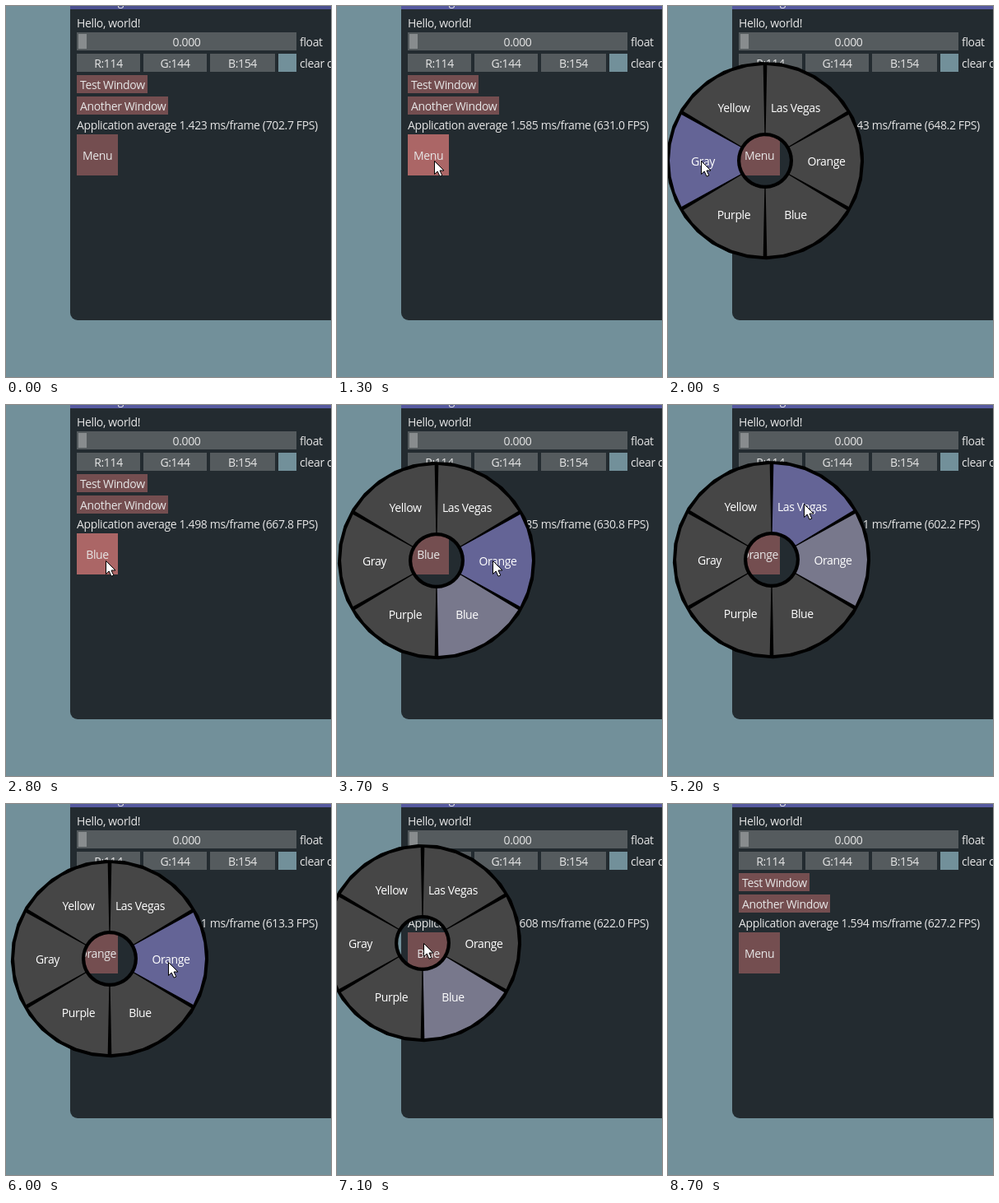
Write an HTML page that moves like this. It is 395 px wide and 451 px high and loops after 8800 ms.

```html
<!DOCTYPE html>
<html lang="en">
<head>
<meta charset="utf-8">
<title>Pie menu</title>
<style>
  html, body { margin: 0; width: 100%; height: 100%; overflow: hidden; background: #72909a; }
  svg { display: block; width: 395px; height: 451px; }
  text { font: 14px "Open Sans", "Noto Sans", sans-serif; letter-spacing: -.36px; fill: #e6e6e6; white-space: pre; }
  .mid { text-anchor: middle; }
  .frame { fill: #555b5e; }
  .button { fill: #744e50; }
  .button.hover { fill: #ab6666; }
  #pie text { fill: #fff; }
</style>
</head>
<body>
<svg viewBox="0 0 395 451">
  <rect width="395" height="451" fill="#72909a"/>
  <path d="M78 0H395V382H87A9 9 0 0 1 78 373Z" fill="#232b30"/>
  <rect id="title" x="78" width="317" height="4"/>
  <text x="102" y="-1">Debug</text>
  <text x="86" y="26">Hello, world!</text>

  <rect class="frame" x="86" y="32" width="267" height="22"/>
  <rect x="88" y="34" width="10" height="18" fill="#888c8e"/>
  <text class="mid" x="219.5" y="49">0.000</text>
  <text x="357" y="49">float</text>

  <rect class="frame" x="86" y="58" width="77" height="22"/>
  <text class="mid" x="124.5" y="75">R:114</text>
  <rect class="frame" x="167" y="58" width="77" height="22"/>
  <text class="mid" x="205.5" y="75">G:144</text>
  <rect class="frame" x="248" y="58" width="79" height="22"/>
  <text class="mid" x="287.5" y="75">B:154</text>
  <rect x="331" y="58" width="22" height="22" fill="#72909a"/>
  <text x="357" y="75">clear color</text>

  <rect class="button" x="86" y="84" width="86" height="22"/>
  <text x="90" y="101">Test Window</text>
  <rect class="button" x="86" y="110" width="111" height="22"/>
  <text x="90" y="127">Another Window</text>
  <text id="stats" x="86" y="150"></text>
  <rect class="button" x="86" y="156" width="50" height="50"/>
  <text id="label" class="mid" x="111" y="187"></text>

  <g id="pie"></g>
  <path id="cursor" d="M.5 .5V16.5L4.2 13L7 19.2L9.8 18L7 12H12Z" fill="#fff" stroke="#000"/>
</svg>
<script>
  const LOOP = 8800, STEP = 100;
  const ITEMS = ['Orange', 'Blue', 'Purple', 'Gray', 'Yellow', 'Las Vegas'];
  const SPAN = 2 * Math.PI / ITEMS.length;
  const R_MIN = 30, R_MAX = 120, R_MID = (R_MIN + R_MAX) / 2, BORDER = 4, R_INTERACT = 20;
  const GAP = .02;

  // hover lists the item positions the cursor visits, evenly spaced in time
  const menus = [
    { open: 1400, close: 2600, x: 118, y: 188, hover: [5, 4, 3, 2, 1, 1], picked: 'Blue' },
    { open: 2900, close: 3800, x: 121, y: 189, hover: [1, 0, 0], picked: 'Orange' },
    { open: 4200, close: 6400, x: 126, y: 188, hover: [2.35, 2.35, 3, 4, 5, 0, 1, 0, .05, 1, 1], picked: 'Blue' },
    { open: 7000, close: 7200, x: 104, y: 169, hover: [], picked: 'Menu' }
  ];
  const fpsPath = [[0, 702.7], [1300, 631], [2800, 667.76], [4600, 593.9],
    [6000, 613.3], [7100, 622], [8700, 627.2]];
  const cursorPath = [[100, 300, 158], [900, 134, 34], ...menus.flatMap(menuStops), [8100, 290, 191]];

  const [title, stats, label, pie, cursor] =
    ['title', 'stats', 'label', 'pie', 'cursor'].map(id => document.getElementById(id));
  const buttons = [...document.querySelectorAll('.button')];

  // The cursor rests on the centre, then circles with a slowly shrinking radius.
  function menuStops({ open, close, x, y, hover }) {
    const stops = hover.map((item, i) => {
      const k = (i + 1) / hover.length, r = 89 - 22 * k;
      return [open + (close - open) * k, x + r * Math.cos(SPAN * item), y + r * Math.sin(SPAN * item)];
    });
    return [[open - STEP, x, y], [open, x, y], ...stops];
  }

  function addSvg(tag, attrs, text = '') {
    const node = document.createElementNS(pie.namespaceURI, tag);
    for (const name in attrs) node.setAttribute(name, attrs[name]);
    node.textContent = text;
    return pie.appendChild(node);
  }

  function arc(radius, from, to, segments = 6) {
    return Array.from({ length: segments + 1 }, (_, i) => {
      const angle = from + (to - from) * i / segments;
      return [radius * Math.cos(angle), radius * Math.sin(angle)].map(v => v.toFixed(2));
    });
  }

  addSvg('polygon', {
    points: arc(R_MID, 0, 2 * Math.PI * .99, 32).join(' '),
    fill: 'none', stroke: '#000', 'stroke-width': R_MAX - R_MIN
  });
  const wedges = ITEMS.map((name, n) => {
    const from = SPAN * (n - .5) + GAP, to = SPAN * (n + .5) - GAP;
    const points = [...arc(R_MAX - BORDER, from, to), ...arc(R_MIN + BORDER, to, from)];
    const wedge = addSvg('polygon', { points: points.join(' ') });
    addSvg('text', {
      class: 'mid', x: R_MID * Math.cos(SPAN * n) - .5, y: R_MID * Math.sin(SPAN * n) + 6
    }, name);
    return wedge;
  });

  const linear = k => k;
  const easeInOut = k => k < .5 ? 4 * k ** 3 : 1 - 4 * (1 - k) ** 3;

  function sample(path, t, ease) {
    const next = path.findIndex(key => key[0] > t);
    if (next < 1) return path.at(next).slice(1);
    const [a, b] = [path[next - 1], path[next]];
    const k = ease((t - a[0]) / (b[0] - a[0]));
    return a.slice(1).map((v, i) => v + (b[i + 1] - v) * k);
  }

  function hoveredItem(dx, dy) {
    if (Math.hypot(dx, dy) < R_INTERACT) return -1;
    return (Math.round(Math.atan2(dy, dx) / SPAN) + ITEMS.length) % ITEMS.length;
  }

  function contains(rect, x, y) {
    const box = rect.getBBox();
    return x >= box.x && x < box.x + box.width && y >= box.y && y < box.y + box.height;
  }

  function draw(t) {
    const [x, y] = sample(cursorPath, t, easeInOut).map(Math.round);
    const [fps] = sample(fpsPath, t, linear);
    const cursorShown = t >= 100 && t < 8600;
    const current = menus.find(m => t >= m.open && t < m.close);
    const selected = menus.reduce((name, m) => t >= m.close ? m.picked : name, 'Menu');

    title.setAttribute('fill', t < 300 ? '#4c5190' : '#565aa0');
    stats.textContent =
      `Application average ${(1000 / fps).toFixed(3)} ms/frame (${fps.toFixed(1)} FPS)`;
    label.textContent = selected;
    for (const button of buttons) {
      button.classList.toggle('hover', cursorShown && !current && contains(button, x, y));
    }

    pie.style.display = current ? '' : 'none';
    if (current) {
      pie.setAttribute('transform', `translate(${current.x} ${current.y})`);
      const hovered = hoveredItem(x - current.x, y - current.y);
      wedges.forEach((wedge, n) => wedge.setAttribute('fill',
        n === hovered ? '#646496' : ITEMS[n] === selected ? '#78788c' : '#464646'));
    }

    cursor.style.display = cursorShown ? '' : 'none';
    cursor.setAttribute('transform', `translate(${x} ${y})`);
  }

  const start = performance.now();
  function tick() {
    const t = (performance.now() - start) % LOOP;
    draw(Math.floor(t / STEP) * STEP);
    requestAnimationFrame(tick);
  }
  tick();
</script>
</body>
</html>
```
